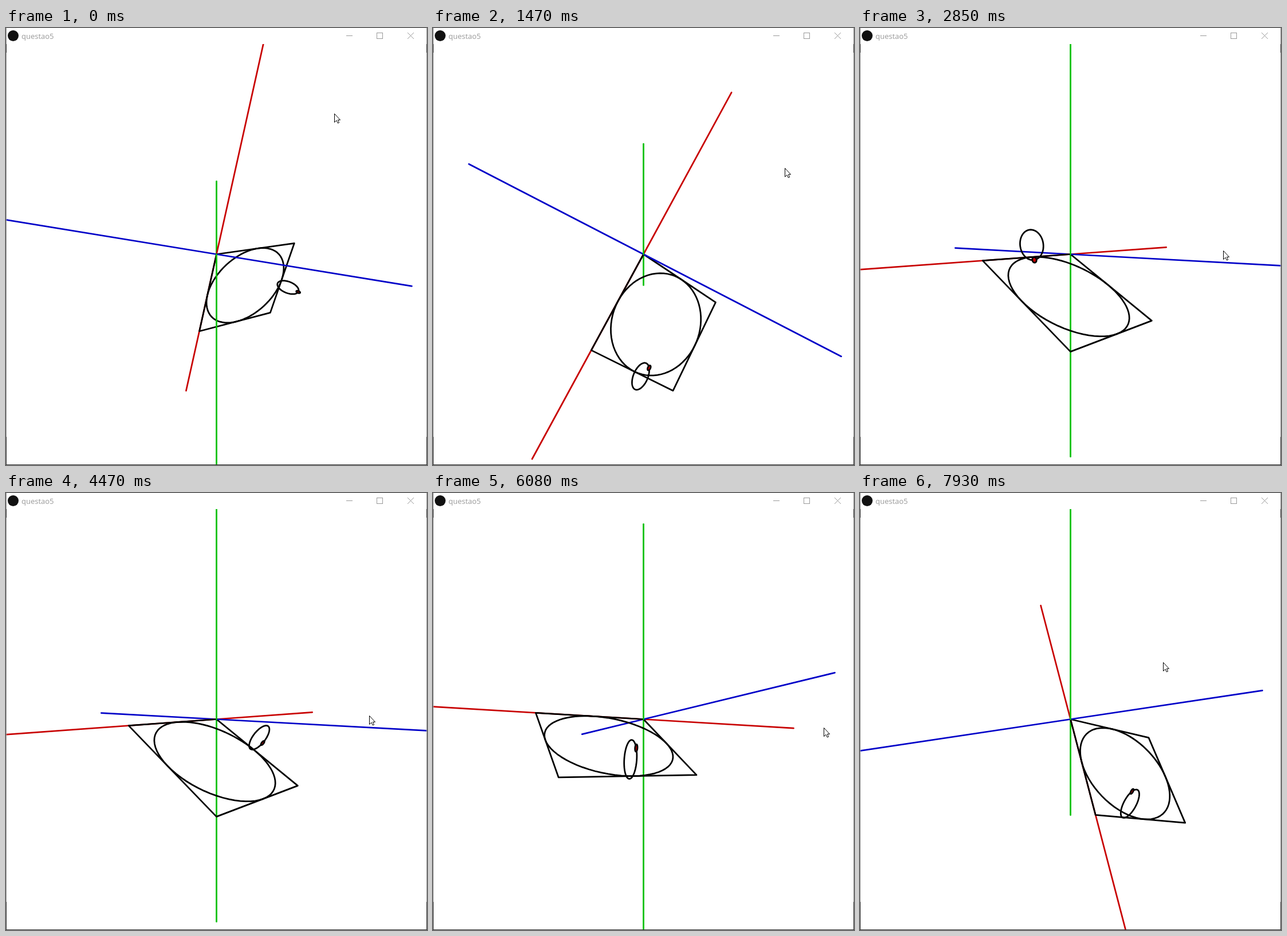
Animation of 735x762 px, one loop 8000 ms. Source, as an HTML page with a canvas:

```html
<!DOCTYPE html>
<html lang="pt">
<head>
<meta charset="utf-8">
<title>questao5</title>
<style>
  html, body { margin: 0; width: 100%; height: 100%; overflow: hidden; background: #fff; }
  canvas { display: block; }
</style>
</head>
<body>
<canvas id="stage" width="735" height="762"></canvas>
<script>
const ctx = document.getElementById('stage').getContext('2d');
const LOOP = 8;
const CX = 367.5, CY = 394.5;
const HALF = 366.5;                 // half the sketch size, also the axis length
const DIST = HALF * Math.sqrt(3);   // camera distance for a 60 degree field of view
const BIG = HALF / 4, WHEEL = BIG / 4, DOT = 4.2;
const BLACK = '#000', RED = '#c80000', GREEN = '#00c000', BLUE = '#0000c8';
const rad = d => d * Math.PI / 180;

// time (s), cursor x, cursor y, pitch, yaw (degrees)
const KEYS = [
  [0, 573, 149, -121.2, -100.8],
  [0.069, 573, 149, -121.2, -100.8],
  [0.07, 573, 92, -121.2, -100.8],
  [0.269, 573, 92, -121.2, -100.8],
  [0.27, 573, 92, -144, -101],
  [1.47, 614, 244, -76.9, -117.9],
  [1.85, 634, 385, -6, -130],
  [1.94, 634, 388, -3.6, -130.9],
  [4.54, 634, 388, -3.6, -130.9],
  [5.24, 681, 408, 6.2, -152.3],
  [5.36, 682, 409, 6.9, -153.7],
  [6.1, 682, 409, 6.9, -153.7],
  [7.24, 565, 325, -30.4, -98.5],
  [7.85, 530, 296, -48, -79.6],
  [7.93, 529, 295, -49.1, -78.8],
  [8, 529, 295, -49.1, -78.8]
];

function poseAt(t) {
  let i = 1;
  while (i < KEYS.length - 1 && KEYS[i][0] < t) i++;
  const from = KEYS[i - 1], to = KEYS[i];
  const k = (t - from[0]) / (to[0] - from[0]);
  return from.slice(1).map((v, j) => v + (to[j + 1] - v) * k);
}

const mix = (...terms) => [0, 1, 2].map(i => terms.reduce((sum, [k, v]) => sum + k * v[i], 0));

function project([x, y, z]) {
  const s = DIST / (DIST - z);
  return [CX + x * s, CY + y * s];
}

function trace(points, color, { closed = false, fill = null, width = 2.75 } = {}) {
  ctx.beginPath();
  points.forEach(p => ctx.lineTo(...project(p)));
  if (closed) ctx.closePath();
  if (fill) { ctx.fillStyle = fill; ctx.fill(); }
  ctx.strokeStyle = color;
  ctx.lineWidth = width;
  ctx.stroke();
}

function ring(center, u, v, r, fill) {
  const points = Array.from({ length: 72 }, (_, i) => {
    const a = i * Math.PI / 36;
    return mix([1, center], [r * Math.cos(a), u], [r * Math.sin(a), v]);
  });
  trace(points, BLACK, { closed: true, fill });
}

function drawScene(t, pitch, yaw) {
  const sa = Math.sin(pitch), ca = Math.cos(pitch), sb = Math.sin(yaw), cb = Math.cos(yaw);
  const X = [cb, sa * sb, -ca * sb];
  const Y = [0, ca, sa];
  const Z = [sb, -sa * cb, ca * cb];
  const O = [0, 0, 0];

  // the square is tilted 30 degrees about the X axis
  const side = mix([0.5, Y], [-Math.sqrt(0.75), Z]);
  const up = mix([-Math.sqrt(0.75), Y], [-0.5, Z]);

  const theta = rad(88.7 - 60 * t), spin = rad(147) - theta;
  const middle = mix([BIG, X], [BIG, side]);
  const radial = mix([Math.cos(theta), X], [Math.sin(theta), side]);
  const hub = mix([1, middle], [BIG, radial], [WHEEL, up]);
  const dot = mix([1, hub], [WHEEL * Math.cos(spin), radial], [WHEEL * Math.sin(spin), up]);

  const halfAxis = (dir, sign, color) => trace([O, mix([sign * HALF, dir])], color);
  const above = () => {
    halfAxis(Z, -1, BLUE);
    halfAxis(Y, -1, GREEN);
    ring(hub, radial, up, WHEEL);
    ring(dot, radial, up, DOT, RED);
  };
  const below = () => {
    halfAxis(Z, 1, BLUE);
    halfAxis(Y, 1, GREEN);
  };
  const plane = () => {
    halfAxis(X, -1, RED);
    halfAxis(X, 1, RED);
    const s = 2 * BIG;
    trace([O, mix([s, X]), mix([s, X], [s, side]), mix([s, side])], BLACK, { closed: true });
    ring(middle, X, side, BIG);
  };
  const layers = [below, plane, above];
  if (up[2] < 0) layers.reverse();
  layers.forEach(draw => draw());
}

function drawWindow() {
  ctx.fillStyle = '#111';
  ctx.beginPath();
  ctx.arc(12.5, 13.5, 9.5, 0, 7);
  ctx.fill();

  ctx.fillStyle = '#999';
  ctx.font = '13px "Open Sans", "Noto Sans", sans-serif';
  ctx.fillText('questao5', 27, 19);

  ctx.strokeStyle = '#999';
  ctx.lineWidth = 1;
  ctx.strokeRect(647.5, 8.5, 10, 10);
  ctx.beginPath();
  ctx.moveTo(594, 13.5); ctx.lineTo(605, 13.5);
  ctx.moveTo(701, 8); ctx.lineTo(712, 19);
  ctx.moveTo(712, 8); ctx.lineTo(701, 19);
  ctx.stroke();

  for (const x of [0, 734]) {
    ctx.fillStyle = '#999';
    ctx.fillRect(x, 0, 1, 762);
    ctx.fillStyle = '#333';
    ctx.fillRect(x, 28, 1, 15);
    ctx.fillRect(x, 713, 1, 49);
  }
  ctx.fillRect(0, 761, 735, 1);
}

const ARROW = new Path2D('M.5 .5V15.5L4 12.2 6.3 17 8.6 16 6.4 11.3H10.5Z');

function drawCursor(x, y) {
  ctx.save();
  ctx.translate(Math.round(x), Math.round(y));
  ctx.fillStyle = '#fff';
  ctx.strokeStyle = '#000';
  ctx.lineWidth = 1;
  ctx.fill(ARROW);
  ctx.stroke(ARROW);
  ctx.restore();
}

function render(now) {
  const t = (now / 1000) % LOOP;
  const [x, y, pitch, yaw] = poseAt(t);
  ctx.fillStyle = '#fff';
  ctx.fillRect(0, 0, 735, 762);
  drawWindow();
  ctx.save();
  ctx.beginPath();
  ctx.rect(1, 28, 733, 733);
  ctx.clip();
  ctx.lineCap = ctx.lineJoin = 'round';
  // the picture pauses briefly near the start
  drawScene(t > 0.07 && t < 0.27 ? 0.07 : t, rad(pitch), rad(yaw));
  ctx.restore();
  drawCursor(x, y);
}

const start = performance.now();
function tick() {
  render(performance.now() - start);
  requestAnimationFrame(tick);
}
tick();
</script>
</body>
</html>
```
